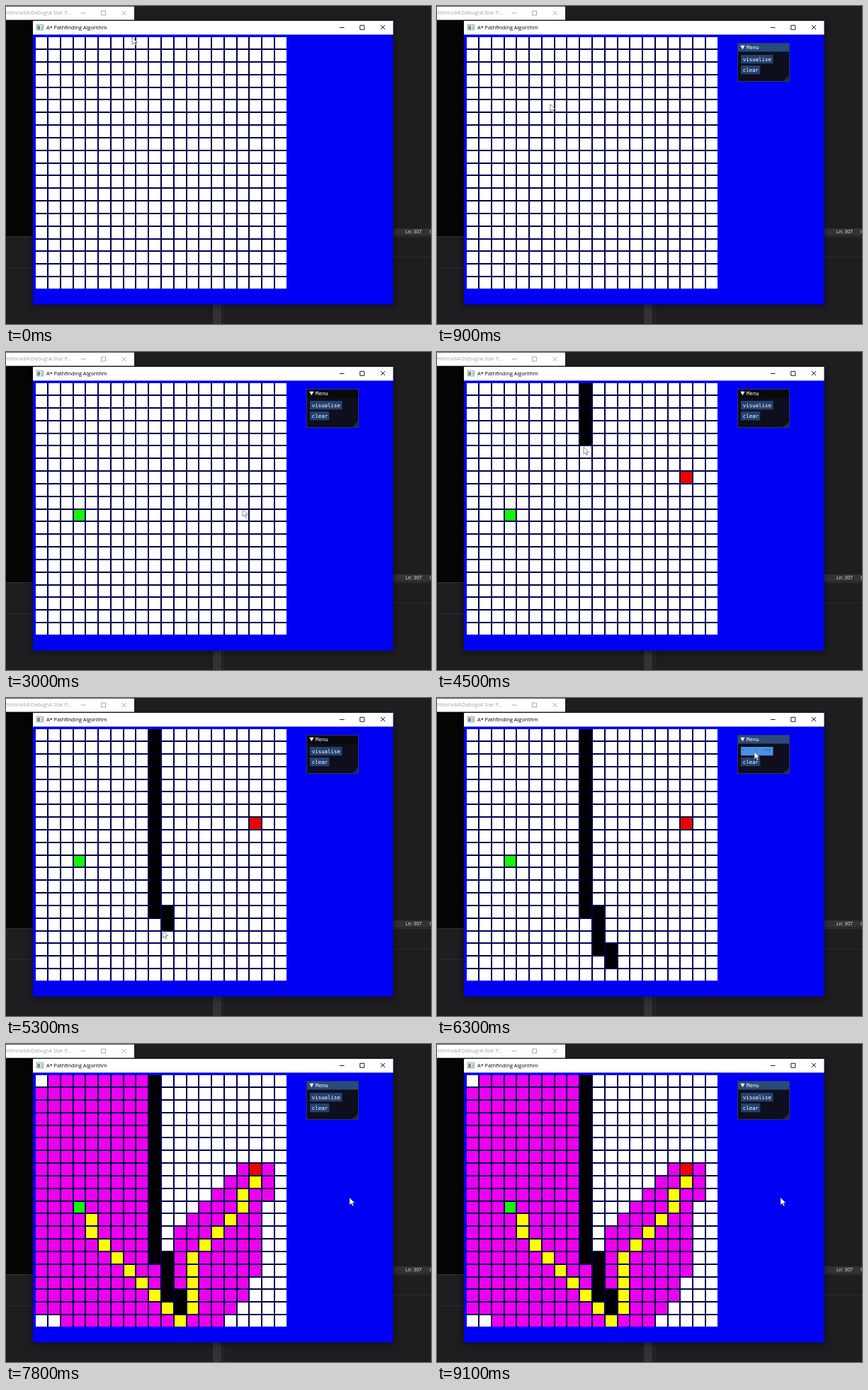
An HTML page for the animation above (9.2 s loop, 600 by 449 pixels).

```html
<!DOCTYPE html>
<html lang="en">
<head>
<meta charset="utf-8">
<title>A* Pathfinding Algorithm</title>
<style>
  html, body { margin: 0; width: 100%; height: 100%; overflow: hidden; background: #1e1e20; }
  svg { display: block; width: 100vw; height: 100vh; }
  text { font-family: "Open Sans", "Noto Sans", sans-serif; white-space: pre; }
  .mono { font: 7.4px "DejaVu Sans Mono", monospace; fill: #fff; }
</style>
</head>
<body>
<svg viewBox="0 0 600 449" preserveAspectRatio="none">
  <defs>
    <filter id="soft" x="-10%" y="-10%" width="120%" height="120%"><feGaussianBlur stdDeviation="5"/></filter>
    <pattern id="dots" width="3" height="3" patternUnits="userSpaceOnUse">
      <rect width="3" height="3" fill="#303033"/><rect width="1" height="1" fill="#48484b"/>
    </pattern>
  </defs>

  <!-- desktop behind -->
  <rect width="600" height="449" fill="#1e1e20"/>
  <rect y="19" width="40" height="306" fill="#050505"/>
  <rect y="325" width="600" height="1" fill="#343437"/>
  <rect x="540" y="314" width="60" height="10" fill="#333336"/>
  <rect x="540" y="354" width="60" height="1" fill="#2b2b2e"/>
  <rect y="369" width="40" height="1" fill="#2b2b2e"/>
  <rect x="292" y="415" width="12" height="34" fill="url(#dots)"/>
  <rect x="307" y="415" width="1" height="34" fill="#2f2f32"/>
  <text x="564" y="321.3" font-size="6.8" fill="#f0f0f0">Ln: 307</text>
  <text x="598" y="321.3" font-size="6.8" fill="#f0f0f0">C</text>
  <rect y=".7" width="181" height="18.9" fill="#fff"/>
  <text x="92" y="12.4" font-size="7.35" fill="#a0a0a0" text-anchor="end">rithm\x64\Debug\A Star P...</text>
  <path d="M105.5 10h7M134.5 7h6v6h-6zM163.5 7l6 6M169.5 7l-6 6" fill="none" stroke="#a0a0a0" stroke-width=".9"/>

  <!-- main window -->
  <rect x="37" y="25" width="511" height="399" fill="#000" opacity=".5" filter="url(#soft)"/>
  <rect x="38" y="21" width="508.5" height="400.5" fill="#0000f4"/>
  <rect x="38" y="21" width="508.5" height="19.4" fill="#fff"/>
  <rect x="43.5" y="26.5" width="9" height="7.5" fill="#f4f4f4" stroke="#8b9196" stroke-width=".8"/>
  <rect x="44.5" y="28" width="3.5" height="5" fill="#4c9a78"/>
  <rect x="49" y="28" width="3" height="5" fill="#c4c9cf"/>
  <text x="57" y="33.1" font-size="7.35" fill="#000">A* Pathfinding Algorithm</text>
  <path d="M471 30.5h6.5M499.8 27.3h6v6h-6zM529 27l6 6M535 27l-6 6" fill="none" stroke="#111" stroke-width=".95"/>

  <rect x="42" y="44" width="354" height="355" fill="#00004c"/>
  <g id="grid"></g>

  <g id="menu">
    <rect x="424.5" y="52.5" width="73" height="54" fill="#0e0e1c" stroke="#3c3c58" stroke-width=".8"/>
    <rect id="bar" x="425" y="53" width="72" height="11.5"/>
    <path d="M428.3 55.8h6.2l-3.1 5.4z" fill="#fff"/>
    <text class="mono" x="437" y="61.2">Menu</text>
    <rect id="run" x="429" y="69" width="45.5" height="12.3"/>
    <text id="runText" class="mono" x="431.8" y="78">visualise</text>
    <path id="runDots" d="M431 73.5h1.2M436 73h1M449 73h1.2M459.5 73.5h1M464 73h2M468.5 73h2" stroke="#12305c" stroke-width="1"/>
    <rect x="429" y="84" width="27.3" height="12.3" fill="#244270"/>
    <text class="mono" x="431.8" y="93">clear</text>
    <path d="M497 98v8h-8z" fill="#1c2c4a"/>
  </g>

  <path id="cursor" d="M0 0v10.2l2.4-2.2 1.6 3.7 1.7-.8-1.6-3.5h3.2z" fill="#fff" stroke="#555" stroke-width=".7"/>
</svg>
<script>
const LOOP = 9200, STEP = 100, N = 20, LINE = 2;
const $ = id => document.getElementById(id);

const COLORS = { open: '#fff', wall: '#000', start: '#14f50a', goal: '#f00000', seen: '#ee00ee', path: '#ffff00' };
const SHOW_MENU = 200, SET_START = 2300, SET_GOAL = 3500, PRESS = 6200, SOLVE = 6400, LEAVE = 6700;

// time, x, y, eased
const MOVES = [
  [0, 178, 44, 0], [300, 178, 44, 0], [1300, 150, 190, 1], [1800, 131, 228, 1],
  [2200, 103, 230, 1], [2400, 103, 230, 0], [3000, 334, 222, 1], [3400, 351, 177, 1],
  [3600, 351, 177, 0], [4100, 207, 50, 1], [4500, 207, 134, 0], [5150, 211, 296, 0],
  [5400, 228, 350, 0], [5600, 243, 374, 0], [6100, 448, 76, 1], [6600, 448, 76, 0],
  [7300, 485, 217, 1], [LOOP, 485, 217, 0]
];

const key = (c, r) => r * N + c;
const run = (c, from, to) => Array.from({ length: to - from + 1 }, (_, i) => key(c, from + i));

const START = key(3, 10), GOAL = key(17, 7);
const walls = [...run(9, 0, 14), ...run(10, 14, 17), ...run(11, 17, 18)];
const wallTime = i => i < 5 ? 4130 + i * 85 : 4555 + (i - 5) * 65;

// columns of the route from the start row down, then back up to the goal
const route = new Set([
  ...[4, 4, 5, 6, 7, 8, 9, 10, 11].map((c, i) => key(c, 11 + i)),
  ...[12, 12, 12, 12, 12, 13, 14, 15, 16, 16, 17].map((c, i) => key(c, 18 - i))
]);

function visited(c, r) {
  if (c < 9) return !(c === 0 && r === 0) && !(c < 2 && r === 19);
  if (r < 7) return false;
  if (r > 14 && c < 11) return true;
  const left = Math.max(11, 23 - r);
  const right = r < 10 ? 18 : r < 16 ? 17 : r < 18 ? 16 : 33 - r;
  return c >= left && c <= right;
}

function rect(x, y, w, h, fill) {
  const el = document.createElementNS('http://www.w3.org/2000/svg', 'rect');
  for (const [k, v] of Object.entries({ x, y, width: w, height: h, fill })) el.setAttribute(k, v);
  return $('grid').appendChild(el);
}

// whole-pixel edges where the line after column c or row r begins
const lineX = c => Math.round(58.1 + c * 17.77);
const lineY = r => Math.round(60.2 + r * 17.82);

const cells = [];
for (let r = 0; r < N; r++)
  for (let c = 0; c < N; c++) {
    const x = lineX(c - 1) + LINE, y = lineY(r - 1) + LINE;
    cells.push(rect(x, y, lineX(c) - x, lineY(r) - y, '#fff'));
  }

// darkened seams between stacked wall cells
const seams = walls.flatMap((k, i) => {
  if (walls[i + 1] !== k + N) return [];
  const c = k % N, x = lineX(c - 1) + LINE;
  return { time: wallTime(i + 1), el: rect(x, lineY(Math.floor(k / N)), lineX(c) - x, LINE, '#000020') };
});

function kind(k, t) {
  if (k === START && t >= SET_START) return 'start';
  if (k === GOAL && t >= SET_GOAL) return 'goal';
  const w = walls.indexOf(k);
  if (w >= 0) return t >= wallTime(w) ? 'wall' : 'open';
  if (t < SOLVE) return 'open';
  if (route.has(k)) return 'path';
  return visited(k % N, Math.floor(k / N)) ? 'seen' : 'open';
}

function pointer(t) {
  const i = MOVES.findIndex(m => m[0] > t);
  const a = MOVES[i - 1], b = MOVES[i];
  let p = (t - a[0]) / (b[0] - a[0]);
  if (b[3]) p = p * p * (3 - 2 * p);
  return [a[1] + (b[1] - a[1]) * p, a[2] + (b[2] - a[2]) * p];
}

const show = (el, on) => el.setAttribute('visibility', on ? 'inherit' : 'hidden');

function draw(t) {
  cells.forEach((el, k) => el.setAttribute('fill', COLORS[kind(k, t)]));
  seams.forEach(s => show(s.el, t >= s.time));
  const hover = t >= 6100 && t < LEAVE;
  show($('menu'), t >= SHOW_MENU);
  $('bar').setAttribute('fill', t < SET_START || t >= PRESS ? '#294a7a' : '#0a0a0c');
  $('run').setAttribute('fill', hover ? '#4a92e4' : '#244270');
  show($('runText'), !hover);
  show($('runDots'), hover);
  $('cursor').setAttribute('transform', `translate(${pointer(t).join(' ')})`);
}

const began = performance.now();
let last = -1;
function tick() {
  const t = Math.floor((performance.now() - began) % LOOP / STEP) * STEP;
  if (t !== last) draw(last = t);
  requestAnimationFrame(tick);
}
tick();
</script>
</body>
</html>
```
